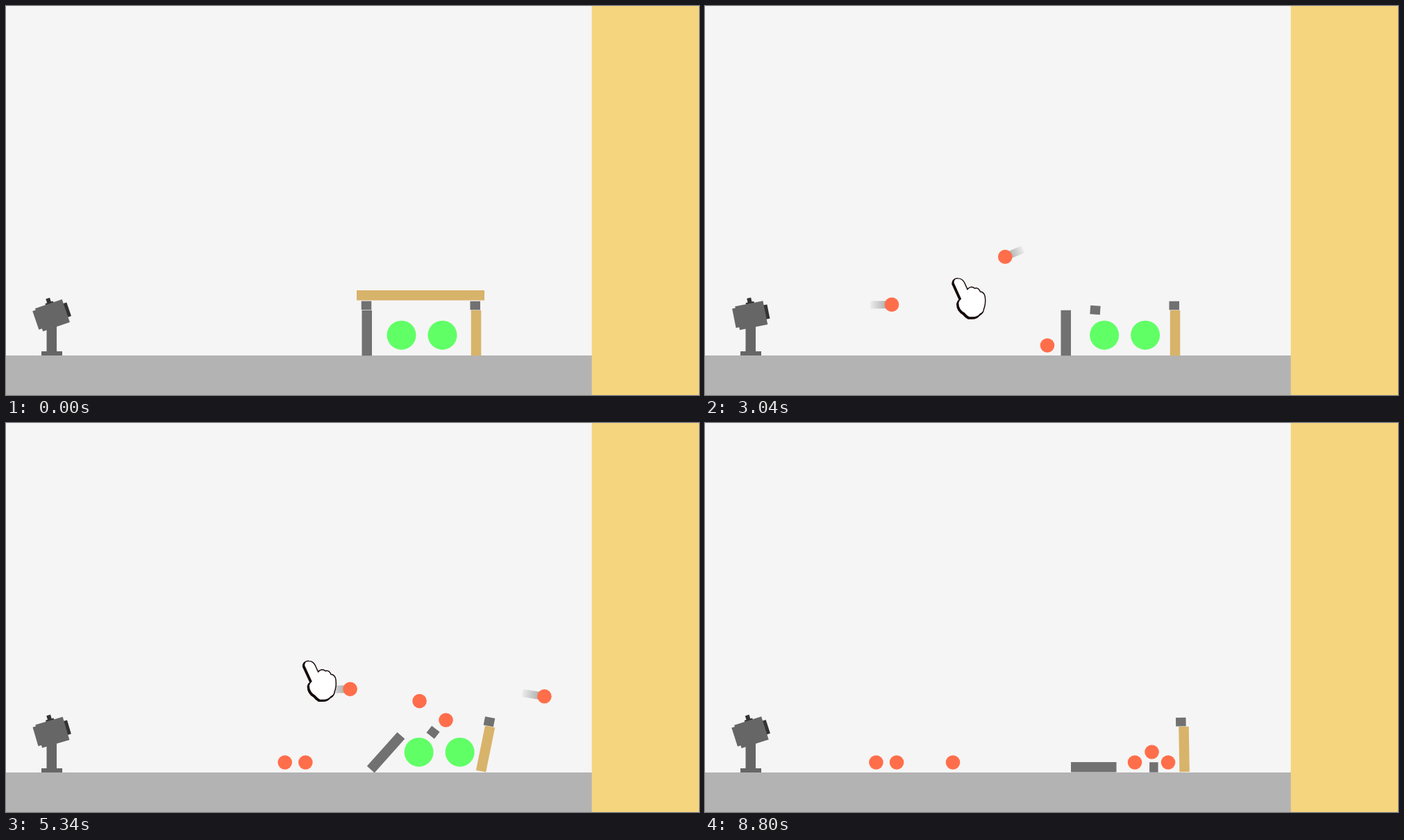
An HTML page with a canvas for the animation above (8.84 s loop, 998x561 px).

```html
<!DOCTYPE html>
<html lang="en">
<head>
<meta charset="utf-8">
<title>Cannon and falling blocks</title>
<style>
  html, body { margin: 0; width: 100%; height: 100%; overflow: hidden; background: #f5f5f5; }
  canvas { display: block; width: 998px; height: 561px; }
</style>
</head>
<body>
<canvas id="stage" width="998" height="561"></canvas>
<script>
const ctx = document.getElementById('stage').getContext('2d');
const LOOP = 8840, FPS = 24;
const GRAVITY = 2.6e-4, FLOOR = 489.5, WALL = 830, DRIFT = -0.0449;
const STONE = '#717171', WOOD = '#d8b36a', STEEL = '#666666', DARK = '#333333';
const PIVOT = [66, 445];
const BEAM_BREAKS = 2440;

// A ball leaves the cannon, flies in parabolas between hits [time, x, y], then rolls.
const shot = (fired, roll, ...hits) => ({ fired, roll, path: [[fired, ...PIVOT], ...hits] });
const balls = [
  shot(933, -0.37, [2262, WALL, 267], [3495, 201, FLOOR]),
  shot(1810, DRIFT, [BEAM_BREAKS, 489, 430], [3042, 493, FLOOR], [3300, 493, FLOOR]),
  shot(2712, DRIFT, [3430, 508, 450], [3875, 506, 479], [3960, 493, FLOOR]),
  shot(3445, 0, [4190, 522, 458], [5333, 633.5, 428.5], [5950, 667, FLOOR]),
  shot(3865, 0, [4590, 531, 432], [5333, 595.5, 401], [6458, 668.5, 461], [7400, 643.5, 474.5]),
  shot(4208, 0, [5420, WALL, 404], [5650, 725, 398], [5970, WALL, 384], [6458, 708, 407],
    [7500, 619, FLOOR]),
  shot(4658, -0.129, [5650, 697, 396], [6458, 679, 408], [6900, 634, 434], [7660, 503, FLOOR])
];

// Poses: [time, x, y, degrees]; the right leg also has the slip of its cap.
const leftLeg = [[3430, 519.75, 471.5, 0], [3875, 535.5, 471.5, 28.5], [6458, 556, 478, 52],
  [6900, 557, 479, 54], [7200, 559.75, 496.3, 90]];
const leftCap = [[BEAM_BREAKS, 519, 431.8, 0], [3042, 562, 438.5, 4], [3875, 587, 438.5, 15],
  [5333, 615, 446, 38], [5850, 646.3, 496.5, 90]];
const rightLeg = [[3600, 677, 471.5, 0, -1.3], [5333, 690.5, 470, 11.5, -2.5],
  [6458, 690, 470.5, 6, -4], [8792, 690, 470.5, -1, -4]];

const tipPath = [[0, 1000, 133], [670, 900, 128], [830, 474, 256], [1150, 309, 262],
  [1350, 309, 262], [1792, 358, 390], [3875, 367, 396], [4160, 425, 330], [4330, 440, 296],
  [4480, 434, 338], [5333, 435, 344], [7260, 437, 345], [7700, 600, 270], [8130, 870, 174],
  [LOOP, 950, 172]];

const KNUCKLES = 'Q20,10 26,15 Q31,13 34,20 Q40,20 41,28 Q42,38 39,45 Q39,50 34,52 ' +
  'Q30,57 24,57 L18,57 Q14,55 11,51 Q2,46 2,36 Q3,32 6,30 ';
const pointing = new Path2D('M-5,6 Q-5,-1 1,0 Q7,0 10,6 L15,17 ' + KNUCKLES + 'Z');
const pressing = new Path2D('M-6,15 Q-5,10 0,10 Q3,4 8,6 Q12,8 12,12 L16,17 ' + KNUCKLES +
  'L4,24 Q-2,25 -6,20 Z');

function at(keys, t, fall) {
  const i = keys.findIndex(k => k[0] > t);
  if (i <= 0) return keys.at(i).slice(1);
  const a = keys[i - 1], b = keys[i], u = (t - a[0]) / (b[0] - a[0]);
  const p = a.slice(1).map((v, j) => v + (b[j + 1] - v) * u);
  const flying = fall && Math.min(a[2], b[2]) < 455;
  if (flying) p[1] -= GRAVITY / 2 * (t - a[0]) * (b[0] - t);
  return p;
}

function ballAt({ path, roll }, t) {
  const [x, y] = at(path, t, true);
  return [x + roll * Math.max(0, t - path.at(-1)[0]), y];
}

const greenX = t => 569.5 + 0.0085 * Math.max(0, t - 2380) + 0.0085 * Math.max(0, t - 5333);

function rect(color, x, y, w, h) {
  ctx.fillStyle = color;
  ctx.fillRect(x, y, w, h);
}

function disc(color, x, y, r) {
  ctx.fillStyle = color;
  ctx.beginPath();
  ctx.arc(x, y, r, 0, Math.PI * 2);
  ctx.fill();
}

function placed(x, y, angle, paint) {
  ctx.save();
  ctx.translate(x, y);
  ctx.rotate(angle);
  paint();
  ctx.restore();
}

function block(keys, t, paint) {
  const [x, y, deg, slip] = at(keys, t);
  placed(x, y, deg * Math.PI / 180, () => paint(slip));
}

const leg = color => rect(color, -7.25, -32.75, 14.5, 65.5);
const cap = (x, y) => rect(STONE, x - 7.25, y - 6.25, 14.5, 12.5);

function drawBall(b, t) {
  if (t < b.fired) return;
  const [x, y] = ballAt(b, t), [px, py] = ballAt(b, t - 50);
  if (Math.hypot(x - px, y - py) > 10) {
    const fade = ctx.createLinearGradient(px, py, x, y);
    fade.addColorStop(0, 'rgba(120,120,120,0.08)');
    fade.addColorStop(1, 'rgba(120,120,120,0.7)');
    ctx.strokeStyle = fade;
    ctx.lineWidth = 11;
    ctx.beginPath();
    ctx.moveTo(px, py);
    ctx.lineTo(x, y);
    ctx.stroke();
  }
  disc('#ff6e4a', x, y, 10.3);
}

// The cannon follows the pointer, also while the pointer is hidden.
function cannon(tip) {
  const aim = Math.atan2(tip[1] - 8 - PIVOT[1], tip[0] - PIVOT[0]);
  rect(STEEL, 58.5, 455, 14.5, 45);
  rect(STEEL, 51, 498, 30, 6);
  placed(...PIVOT, aim, () => {
    rect(DARK, -1, -24, 6, 9);
    rect(DARK, -4, -18, 12, 4);
    rect(DARK, 20, -9.7, 5.8, 20.7);
    rect(STEEL, -24.7, -13.7, 10, 28.3);
    rect(STEEL, -20, -16, 41, 34.7);
  });
}

function pointer(tip, t) {
  const pressed = balls.some(b => t >= b.fired && t < b.fired + 90);
  const shape = pressed ? pressing : pointing;
  placed(...tip, 0, () => {
    ctx.scale(0.96, 0.96);
    ctx.lineJoin = 'round';
    ctx.fillStyle = ctx.strokeStyle = '#150808';
    ctx.translate(-1.5, 1.5);
    ctx.lineWidth = 4;
    ctx.fill(shape);
    ctx.stroke(shape);
    ctx.translate(1.5, -1.5);
    ctx.lineWidth = 3;
    ctx.stroke(shape);
    ctx.fillStyle = '#ffffff';
    ctx.fill(shape);
  });
}

function draw(t) {
  const tip = at(tipPath, t);
  rect('#f5f5f5', 0, 0, 998, 561);
  rect('#b3b3b3', 0, 504, 844, 57);
  if (t < BEAM_BREAKS) rect(WOOD, 505, 410, 184, 14.5);
  block(leftLeg, t, () => leg(STONE));
  block(leftCap, t, () => cap(0, 0));
  block(rightLeg, t, slip => {
    leg(WOOD);
    cap(slip, -39.5);
  });
  if (t < 6900) disc('#61ff66', greenX(t), 474.7, 21);
  if (t < 5440) disc('#61ff66', greenX(t) + 59, 474.7, 21);
  balls.forEach(b => drawBall(b, t));
  cannon(tip);
  rect('#f5d57e', 843.6, 0, 155, 561);
  if (t >= 825 && t < 8130) pointer(tip, t);
}

const start = performance.now();
function tick() {
  const t = (performance.now() - start) % LOOP;
  draw(Math.floor((t + 5) * FPS / 1000) * 1000 / FPS);
  requestAnimationFrame(tick);
}
tick();
</script>
</body>
</html>
```
